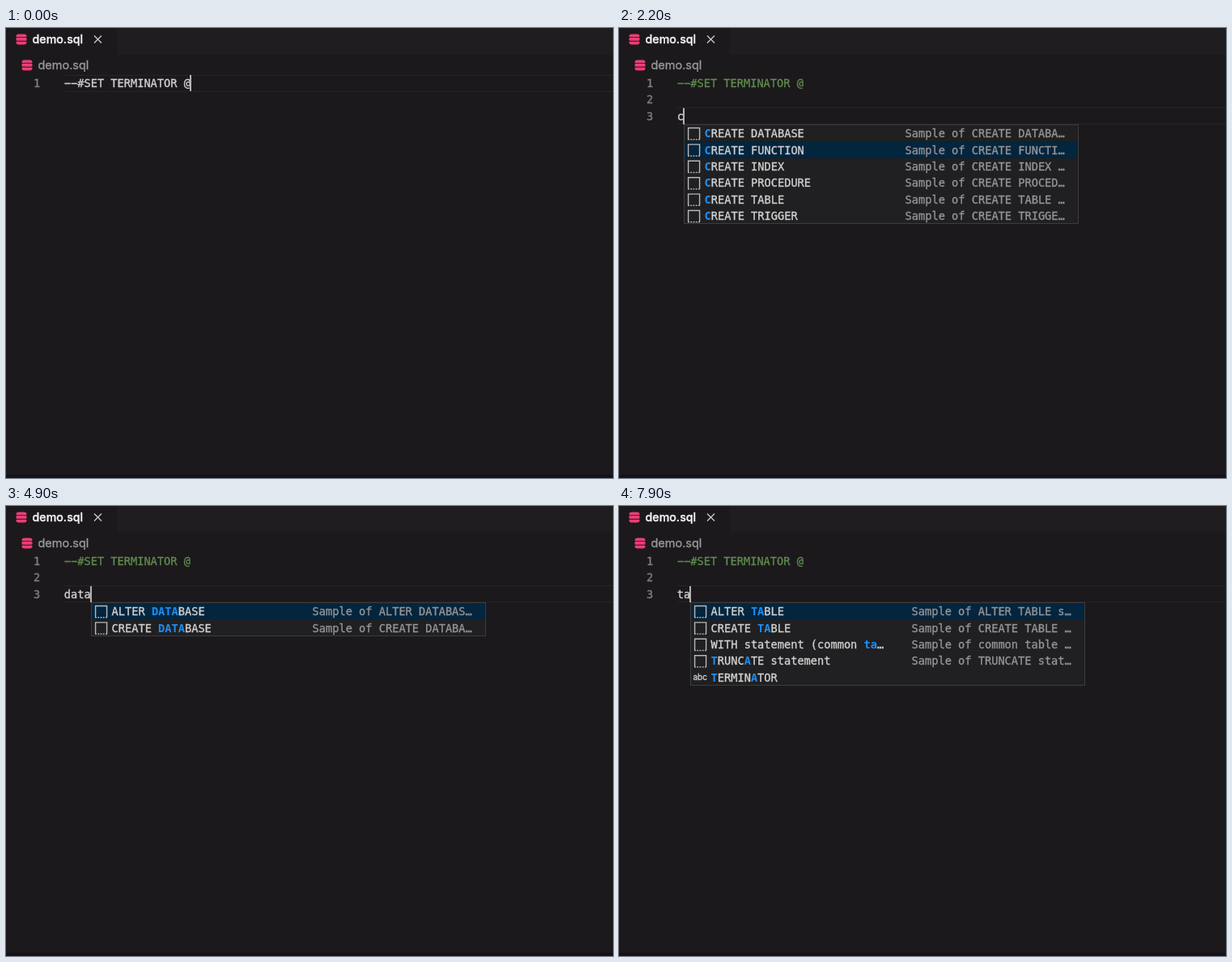
An HTML page with a canvas for the animation above (8 s loop, 750 by 556 pixels).

```html
<!DOCTYPE html>
<html lang="en">
<head>
<meta charset="utf-8">
<title>SQL snippets</title>
<style>
html, body { margin: 0; width: 100%; height: 100%; overflow: hidden; background: #1b191c; }
canvas { display: block; width: 750px; height: 556px; }
</style>
</head>
<body>
<canvas id="stage"></canvas>
<script>
const W = 750, H = 556, LOOP = 8000;
const CELL = 8.215, LINE = 20.4, LEFT = 71.8, TOP = 68;
const MONO = '"DejaVu Sans Mono", monospace';
const CODE = '13.65px ' + MONO, BOLD = 'bold ' + CODE;
const UI = 'Inter, "Open Sans", sans-serif';
const TEXT = '#d0d0d0', KEY = '#4f94cf', COMMENT = '#5f8a4c', PINK = '#e93f74';

const canvas = document.getElementById('stage');
const scale = window.devicePixelRatio || 1;
canvas.width = W * scale;
canvas.height = H * scale;
const ctx = canvas.getContext('2d');

const samples = names => names.map(n => [n, 'Sample of ' + n + ' statement']);
const creates = samples(['DATABASE', 'FUNCTION', 'INDEX', 'PROCEDURE', 'TABLE', 'TRIGGER'].map(n => 'CREATE ' + n));
const databases = samples(['ALTER DATABASE', 'CREATE DATABASE']);
const withRow = ['WITH statement (common ta…', 'Sample of common table expression'];
const truncate = ['TRUNCATE statement', 'Sample of TRUNCATE statement'];
const word = ['TERMINATOR', ''];
const tables = [...samples(['ALTER TABLE', 'CREATE TABLE']), withRow, truncate, word];
const tOnly = [...samples(['ALTER TABLE', 'CREATE TABLE', 'CREATE TRIGGER']), truncate, withRow, word];

// Square brackets mark the snippet's tab stops.
const functionBody = `CREATE FUNCTION [function-name]
    ([parameter] [type])
    RETURNS [type]
    LANGUAGE SQL
    DETERMINISTIC
    NO EXTERNAL ACTION
    CONTAINS SQL
    CALLED ON NULL INPUT
BEGIN
    DECLARE [result] INTEGER;

    SET [result] = [value];

    IF [condition] THEN
        SET [result] = [value];
    END IF;
END@`.split('\n');

const procedureBody = `CREATE PROCEDURE [procedure-name]
    (IN [parameter] [type],
     OUT [parameter] [type])
    LANGUAGE SQL
    DETERMINISTIC
    MODIFIES SQL DATA
    COMMIT ON RETURN NO
BEGIN
    DECLARE [variable] INTEGER;
    DECLARE [cursor] CURSOR FOR
        SELECT [column]
        FROM [table]
        ORDER BY [column];

    OPEN [cursor];
    FETCH FROM [cursor]
        INTO [variable];
    CLOSE [cursor];

    SET [parameter] = [variable];
END@`.split('\n');

const databaseBody = `CREATE DATABASE [DSN8D12P]
    BUFFERPOOL [bpname]
    INDEXBP [bpname]
    STOGROUP [stogroup-name]
    CCSID [ccsid-value]`.split('\n');

const steps = [];
const add = (t, state) => steps.push({ t, line: 3, typed: '', ...state });
const type = (t, typed, list, sel = 0) => add(t, { typed, list, sel });
const body = (t, lines, stop = 0) => add(t, { lines, stop });

add(0, { line: 1 });
add(200, { line: 2 });
add(300, {});
type(400, 'c', creates);
type(500, 'cre', creates);
type(600, 'creat', creates);
type(700, 'create', creates);
type(800, 'create', creates, 1);
type(900, 'create', creates, 2);
type(1100, 'create', creates, 1);
body(1300, functionBody);
add(1900, {});
type(2200, 'c', creates, 1);
type(2400, 'cr', creates, 1);
type(2500, 'crea', creates, 1);
type(2700, 'create', creates, 1);
type(3300, 'create', creates, 2);
type(3400, 'create', creates, 3);
body(3600, procedureBody);
add(4600, {});
type(4700, 'd', databases);
type(4800, 'dat', databases);
type(4900, 'data', databases);
type(5300, 'data', databases, 1);
body(5700, databaseBody);
for (let i = 1; i < 5; i++) body(6300 + i * 200, databaseBody, i);
add(7300, {});
type(7600, 't', tOnly);
type(7800, 'ta', tables);

// Blink restarts on edits and caret jumps, not when the list selection moves.
steps.forEach((s, i) => {
  const p = steps[i - 1];
  s.since = p && s.list && p.list && p.typed === s.typed ? p.since : s.t;
});

const rowY = n => TOP + (n - 1) * LINE;

function rect(x, y, w, h, color) {
  ctx.fillStyle = color;
  ctx.fillRect(x, y, w, h);
}

// A hairline stroke gives the slightly heavier smoothing of desktop text.
function label(str, x, y, font, color, weight = 0.35) {
  ctx.font = font;
  ctx.fillStyle = ctx.strokeStyle = color;
  ctx.lineWidth = weight;
  ctx.fillText(str, x, y);
  ctx.strokeText(str, x, y);
}

// Monospaced run on the editor's grid; hyphens use the wide stroke.
function mono(str, x, y, color, font = CODE) {
  [...str].forEach((ch, i) => {
    if (ch !== ' ') label(ch === '-' ? '−' : ch, x + i * CELL, y + 5, font, color, font === BOLD ? 0.1 : 0.35);
  });
}

function discs(x, y) {
  ctx.fillStyle = PINK;
  for (let i = 0; i < 3; i++) {
    ctx.beginPath();
    ctx.roundRect(x, y + i * 4.6, 13, 3.7, i === 1 ? 1.2 : [i ? 1 : 4, i ? 1 : 4, i ? 4 : 1, i ? 4 : 1]);
    ctx.fill();
  }
}

function chrome() {
  rect(0, 0, W, H, '#1b191c');
  rect(137, 0, W - 137, 33, '#1f1d20');
  rect(0, 552, W, 4, '#141216');
  discs(12.5, 7.5);
  discs(19.5, 39.5);
  label('demo.sql', 32.6, 19, '500 14.2px ' + UI, '#f2f2f2');
  label('demo.sql', 39.4, 51, '14.5px ' + UI, '#989898');
  ctx.strokeStyle = '#d0d0d0';
  ctx.lineWidth = 1.2;
  ctx.beginPath();
  ctx.moveTo(109, 9.5); ctx.lineTo(118, 18.5);
  ctx.moveTo(118, 9.5); ctx.lineTo(109, 18.5);
  ctx.stroke();
}

function currentLine(n) {
  const y = Math.round(rowY(n) - 10.5);
  rect(LEFT, y, W - LEFT, 1, '#262427');
  rect(LEFT, y + 20, W - LEFT, 1, '#262427');
}

function lineNumbers(count) {
  for (let n = 1; n <= count; n++) {
    const s = String(n);
    mono(s, 42.2 - s.length * CELL, rowY(n), '#818181');
  }
}

// Returns the end positions of the tab stops.
function snippet(lines) {
  const stops = [];
  lines.forEach((line, i) => {
    const y = rowY(i + 3);
    let col = 0;
    if (/^ /.test(line)) rect(LEFT, y - 10.2, 1, LINE, '#5c5c5c');
    for (const part of line.split(/(\[[^\]]*\])/)) {
      const slot = part[0] === '[';
      const str = slot ? part.slice(1, -1) : part;
      const x = LEFT + col * CELL;
      if (slot) {
        rect(x, y - 10, str.length * CELL, 20, '#373638');
        stops.push({ x: x + str.length * CELL, y });
      }
      const isKey = slot ? /^(stogroup|ccsid)$/ : /^[A-Z]+$/;
      let at = x;
      for (const piece of str.split(/([A-Za-z0-9]+)/)) {
        mono(piece, at, y, isKey.test(piece) ? KEY : TEXT);
        at += piece.length * CELL;
      }
      col += str.length;
    }
  });
  const end = stops[stops.length - 1];
  rect(Math.round(end.x), end.y - 10, 1, 20, '#6a6a6a');
  return stops;
}

// Letters of a label that match the typed text: at a word start, or in order.
function matches(name, typed) {
  const low = name.toLowerCase();
  const start = low.search(new RegExp('\\b' + typed));
  if (start >= 0) return [...typed].map((_, i) => start + i);
  let from = -1;
  return [...typed].map(ch => from = low.indexOf(ch, from + 1));
}

function frameIcon(x, y) {
  ctx.strokeStyle = '#b8b8b8';
  ctx.lineWidth = 1.4;
  ctx.beginPath();
  ctx.moveTo(x, y + 7);
  ctx.lineTo(x, y - 7);
  ctx.lineTo(x + 14, y - 7);
  ctx.lineTo(x + 14, y + 7);
  ctx.stroke();
  for (let i = 0; i < 5; i++) rect(x - 0.6 + i * 3.25, y + 6.5, 1.9, 1.4, '#b8b8b8');
}

function popup({ list, sel, typed }) {
  const x = Math.round(LEFT + typed.length * CELL + 0.2);
  const y = 119.5, h = list.length * LINE;
  rect(x, y, 488, h, '#201f21');
  list.forEach(([name, info], i) => {
    const cy = 130.2 + i * LINE;
    if (i === sel) rect(x, cy - 10.2, 487, LINE, '#04253e');
    if (info) frameIcon(x + 5.6, cy + 0.3);
    else label('abc', x + 3.5, cy + 3.5, '10px ' + UI, '#c8c8c8');
    const hit = matches(name, typed);
    [...name].forEach((ch, k) => {
      const on = hit.includes(k);
      mono(ch, x + 25.6 + k * CELL, cy, on ? '#1e8ced' : TEXT, on ? BOLD : CODE);
    });
    if (info) mono(info.slice(0, 23) + '…', x + 273.6, cy, '#949396');
  });
  ctx.strokeStyle = '#3c3b3e';
  ctx.lineWidth = 1;
  ctx.strokeRect(x + 0.5, y, 487, Math.round(h));
}

function draw(time) {
  const s = steps.findLast(step => step.t <= time);
  ctx.setTransform(scale, 0, 0, scale, 0, 0);
  chrome();
  const line = s.lines ? 3 + s.lines.findIndex((l, i) =>
    s.lines.slice(0, i + 1).join('').split('[').length - 1 > s.stop) : s.line;
  if (!s.lines) currentLine(line);
  lineNumbers(s.lines ? s.lines.length + 2 : s.line);
  const header = '--#SET TERMINATOR @';
  mono(header, LEFT, rowY(1), s.line === 1 ? TEXT : COMMENT);
  let caret = { x: LEFT + (s.line === 1 ? header.length : s.typed.length) * CELL, y: rowY(line) };
  if (s.lines) caret = snippet(s.lines)[s.stop];
  else mono(s.typed, LEFT, rowY(3), TEXT);
  if (s.list) popup(s);
  if ((time - s.since) % 1000 < 500) rect(Math.round(caret.x - 1), Math.round(caret.y - 10), 2, 20, '#b4b4b2');
}

const begin = performance.now();
function tick() {
  draw((performance.now() - begin) % LOOP);
  requestAnimationFrame(tick);
}
tick();
</script>
</body>
</html>
```
